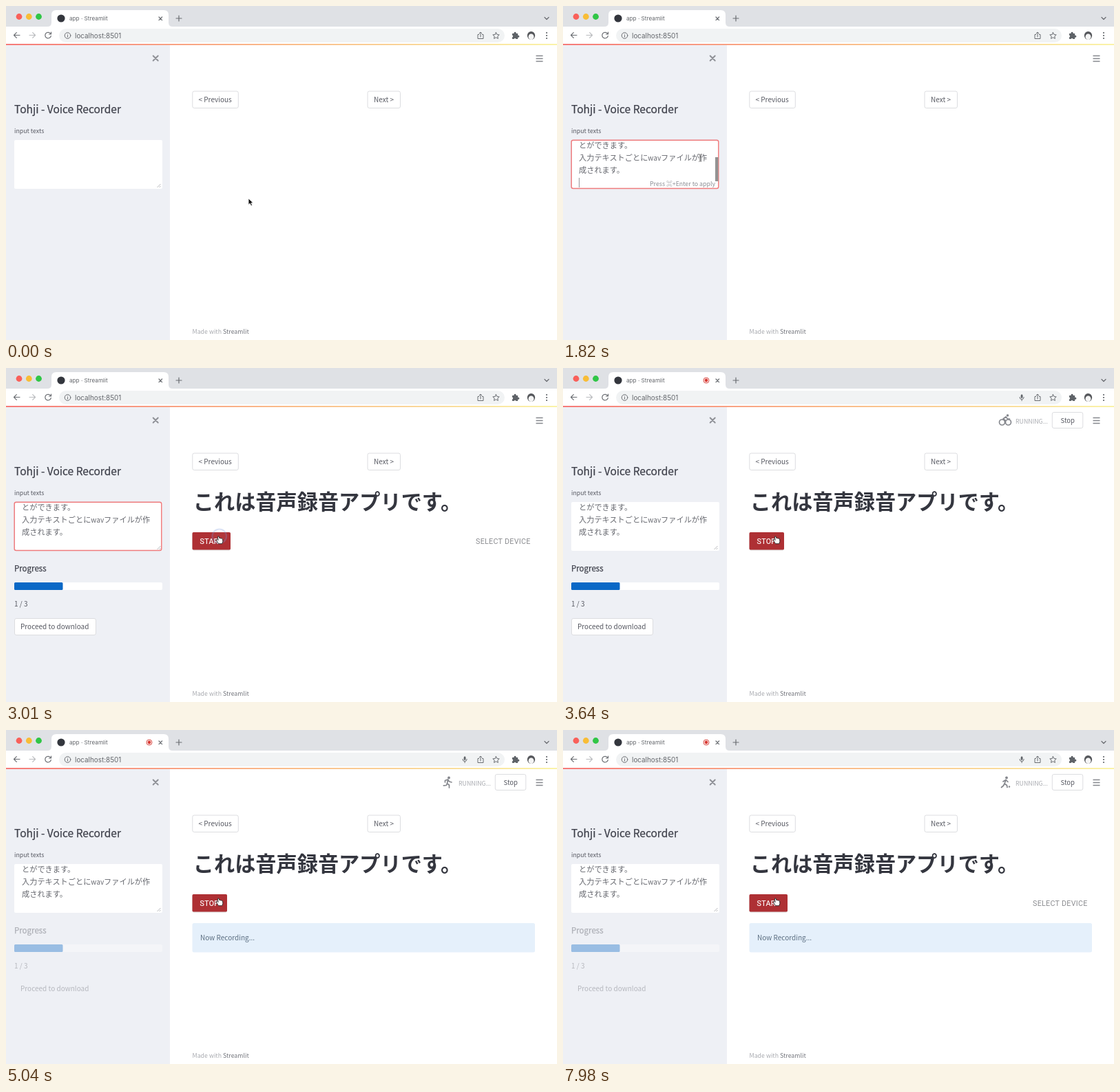
Write an HTML page that moves like this. It is 800 px wide and 486 px high and loops after 8 s.

```html
<!DOCTYPE html>
<html lang="ja">
<head>
<meta charset="utf-8">
<title>Voice Recorder</title>
<style>
  html, body { margin: 0; width: 100%; height: 100%; overflow: hidden; background: #fff; }
  svg { display: block; width: 800px; height: 486px; }
  text { font: 10px "Noto Sans CJK JP", "Noto Sans CJK", sans-serif; fill: #565861; white-space: pre; }
  .chrome { font-family: Inter, sans-serif; fill: #63666b; }
  .small { font-size: 8.8px; }
  .pale { fill: #a9abb0; }
  .medium { fill: #3f414b; stroke: #3f414b; stroke-width: .25px; }
  .area text { font-size: 11.2px; fill: #66686f; }
  .area .latin { font-size: 10px; }
  .mui { font: 10.7px Roboto, sans-serif; letter-spacing: .3px; }
  .white { fill: #fff; stroke: #fff; stroke-width: .2px; }
  .button { fill: #fff; stroke: #dcdde0; }
  .icon { fill: none; stroke: #696c71; stroke-width: 1.2; stroke-linecap: round; stroke-linejoin: round; }
  .thin { stroke-width: 1; }
  .figure { fill: none; stroke: #85878d; stroke-width: 1.7; stroke-linecap: round; stroke-linejoin: round; }
  .figure .head { fill: #85878d; stroke: none; }
</style>
</head>
<body>
<svg viewBox="0 0 800 486">
  <defs>
    <linearGradient id="rainbow">
      <stop stop-color="#f67a78"/><stop offset=".5" stop-color="#fabb8a"/><stop offset="1" stop-color="#faf3a8"/>
    </linearGradient>
    <clipPath id="areaClip"><rect x="13" y="196" width="213" height="69"/></clipPath>
  </defs>

  <!-- Browser -->
  <rect width="800" height="486" fill="#fff"/>
  <rect width="800" height="30" fill="#dfe1e5"/>
  <circle cx="19" cy="15.500" r="4.400" fill="#f9605a"/>
  <circle cx="33.300" cy="15.500" r="4.400" fill="#f8bd36"/>
  <circle cx="47.500" cy="15.500" r="4.400" fill="#30c646"/>
  <path d="M60 30Q66 30 66 24V13Q66 6 73 6H229Q236 6 236 13V24Q236 30 242 30Z" fill="#fff"/>
  <circle cx="80" cy="18" r="5.600" fill="#33363d"/>
  <text class="chrome" x="92" y="21" style="font-size:8.200px">app · Streamlit</text>
  <path class="icon" d="M222 16l4.600 4.600M226.600 16l-4.600 4.600M247 18h8M251 14v8M782 16.500l3 3 3-3"/>
  <g class="icon">
    <path d="M20 42.500H11.500M15.300 38.700l-3.800 3.800 3.800 3.800"/>
    <path stroke="#b9bbbe" d="M34 42.500h8.500M38.700 38.700l3.800 3.800-3.800 3.800"/>
    <path d="M64.500 40a4.300 4.300 0 1 0 .8 3.700M65.500 38v3h-3"/>
  </g>
  <rect x="77" y="33" width="647" height="20" rx="10" fill="#f1f3f4"/>
  <g class="icon thin">
    <circle cx="89.500" cy="43" r="4.300"/>
    <path d="M89.500 42.700v2.300M89.500 41v0"/>
    <path d="M686.500 41.500h-1.500v6h8v-6h-1.500M689 45v-6.500M687 40l2-2 2 2"/>
    <path d="M711.500 38.500l1.400 3 3.300.4-2.400 2.200.6 3.300-2.900-1.600-2.900 1.600.6-3.300-2.400-2.200 3.300-.4Z"/>
  </g>
  <text class="chrome" x="100" y="46.500" style="font-size:9.900px">localhost:8501</text>
  <path fill="#5f6368" d="M735 40h2.500a1.700 1.700 0 1 1 3.200 0h2.500v2.700a1.600 1.600 0 1 1 0 3V48h-2.700a1.600 1.600 0 0 0-3 0H735v-2.600a1.500 1.500 0 0 0 0-2.900Z"/>
  <ellipse cx="762.500" cy="43" rx="5.700" ry="6" fill="#55575b"/>
  <ellipse cx="762.500" cy="44.800" rx="4" ry="4.300" fill="#f5f5f5"/>
  <g fill="#5f6368"><circle cx="785" cy="39" r="1.100"/><circle cx="785" cy="43" r="1.100"/><circle cx="785" cy="47" r="1.100"/></g>
  <g id="tabRecording">
    <circle cx="208" cy="18" r="4" fill="none" stroke="#d9504a"/><circle cx="208" cy="18" r="2.400" fill="#d93b35"/>
    <rect x="664.700" y="38.500" width="2.800" height="5.500" rx="1.400" fill="#5f6368"/>
    <path class="icon thin" d="M663 42.500a3.100 3.100 0 0 0 6.200 0M666.100 45.700v2"/>
  </g>

  <!-- Sidebar -->
  <rect y="57" width="238" height="429" fill="#eef0f5"/>
  <rect y="55" width="800" height="2" fill="url(#rainbow)"/>
  <path d="M213.700 72.500l7 7M220.700 72.500l-7 7" stroke="#8f9197" stroke-width="2" stroke-linecap="round"/>
  <text class="medium" x="12" y="155.500" style="font-size:15.500px">Tohji - Voice Recorder</text>
  <text class="small" x="12" y="185">input texts</text>
  <rect x="12" y="195" width="215" height="71" rx="2" fill="#fff"/>
  <g id="areaText" class="area" clip-path="url(#areaClip)">
    <text x="23" y="207">とができます。</text>
    <text x="23" y="225">入力テキストごとに<tspan class="latin">wav</tspan>ファイルが作</text>
    <text x="23" y="243">成されます。</text>
  </g>
  <path id="resizer" d="M219.500 264l5-5M222.500 264l2-2" stroke="#a5a6aa" stroke-width=".8"/>
  <rect id="focusRing" x="12.200" y="195.300" width="213.600" height="70.200" rx="2.500" fill="none" stroke="#ee7b7d" stroke-width="1.500"/>
  <path id="caret" d="M23.500 250v14" stroke="#96979c"/>
  <g id="pasteHint">
    <rect x="221" y="220" width="4.500" height="35" fill="#939393"/>
    <text class="small" x="126" y="261.500" style="fill:#8b8d93">Press ⌘+Enter to apply</text>
  </g>
  <g id="progress">
    <text class="medium" x="12" y="296" style="font-size:11.500px">Progress</text>
    <rect x="12" y="312" width="215" height="11" rx="2" fill="#fff"/>
    <rect x="12" y="312" width="70.500" height="11" rx="1.500" fill="#0a68c6"/>
    <text x="12" y="347">1 / 3</text>
    <rect id="downloadButton" class="button" x="12.500" y="364.500" width="118" height="24" rx="2.500"/>
    <text x="21" y="380">Proceed to download</text>
  </g>

  <!-- Main pane -->
  <path d="M769.500 72.500h10M769.500 76.500h10M769.500 80.500h10" stroke="#85878d" stroke-width="1.500"/>
  <rect class="button" x="270.800" y="124" width="66.500" height="24.500" rx="2.500"/>
  <text x="279.500" y="140">&lt; Previous</text>
  <rect class="button" x="525" y="124" width="47.500" height="24.500" rx="2.500"/>
  <text x="534" y="140">Next &gt;</text>
  <text x="270.500" y="477" class="pale" style="font-size:8.800px">Made with <tspan fill="#73757c">Streamlit</tspan></text>

  <g id="status">
    <g class="figure">
      <g id="bike">
        <circle cx="637.500" cy="79" r="4"/><circle cx="646.500" cy="79" r="4"/>
        <path d="M642 80v-4l-3-2 4-3 2.500 3h3"/><circle class="head" cx="645.500" cy="69" r="1.800"/>
      </g>
      <g id="run">
        <circle class="head" cx="643" cy="69.500" r="1.900"/>
        <path d="M637.500 76v-2.500l4-1.500 2 3 3.500 1M641.500 73l-1 5 3 2v4M640.300 78l-1 2.500-4 .3"/>
      </g>
      <g id="kick">
        <circle class="head" cx="644" cy="69.500" r="1.900"/>
        <path d="M639 75l4-2.500 3 3M643 73l-2 5 3.500 2.500.5 3M641 78l-1.500 3-3 2.500"/>
        <circle class="head" cx="648" cy="82.500" r="1.200"/>
      </g>
    </g>
    <text class="small pale" x="657" y="81">RUNNING...</text>
    <rect class="button" x="710.300" y="64.500" width="44.500" height="23" rx="2.500"/>
    <text x="722.500" y="79.500" style="font-size:9.500px">Stop</text>
  </g>

  <text id="heading" x="271.800" y="205.500" style="font-size:30.200px;font-weight:700;fill:#34363f">これは音声録音アプリです。</text>
  <g id="recorder">
    <rect id="shadow" x="270.500" y="240" height="25.500" rx="2" fill="#000" opacity=".14"/>
    <rect id="recordButton" x="270.500" y="239" height="25.500" rx="1.800"/>
    <text id="recordLabel" class="mui white" x="281.500" y="255.700"></text>
    <text id="selectDevice" class="mui" x="682" y="255.700" style="fill:#8b8c90">SELECT DEVICE</text>
  </g>
  <g id="notice">
    <rect x="270.500" y="281" width="497.500" height="42.500" rx="2.500" fill="#e5f0fb"/>
    <text x="282" y="306" style="fill:#5b6e81">Now Recording...</text>
  </g>

  <!-- Pointer -->
  <circle id="clickRing" cx="309.800" cy="244.800" fill="#fff" fill-opacity=".12" stroke="#7d9bdd" stroke-width="2.200"/>
  <g id="pointer">
    <path id="arrow" d="M0 0v9.300l2.200-2 1.600 3.500 1.700-.8-1.500-3.300h3Z" fill="#111" stroke="#fff" stroke-width=".8"/>
    <path id="beam" d="M-2-5.500q2 0 2 1.500v8q0 1.500-2 1.500M2-5.500q-2 0-2 1.500v8q0 1.500 2 1.500" fill="none" stroke="#777" stroke-width=".8"/>
    <path id="hand" d="M-.8-4.800q-1.700-.8-1.900.8l.8 4.600-1.600-1.300q-1.700-.2-1.200 1.200l3.200 5.200h5.300l1.100-3.300-.3-3.400q-.6-1.200-1.500-.6-.6-1-1.700-.5-.6-.8-1.600-.3Z" fill="#fff" stroke="#222" stroke-width=".9"/>
  </g>
</svg>
<script>
const LOOP = 8000, STEP = 70;
const FIGURES = ["run", "run", "bike", "kick", "kick", "bike", "run", "bike", "bike"];
const CLICKS = [2960, 6510];
// Pointer stops: time, x, y
const PATH = [[630, 352, 280], [1120, 199, 221], [2310, 199, 221], [2800, 310, 250], [LOOP, 310, 250]];

const parts = Object.fromEntries([...document.querySelectorAll("[id]")].map(e => [e.id, e]));
const within = (t, start, end = LOOP) => t >= start && t < end;
const clamp = v => Math.max(0, Math.min(1, v));
const ease = v => v * v * (3 - 2 * v);
const show = (id, visible) => { parts[id].style.display = visible ? "" : "none"; };

function pointerAt(t) {
  const next = PATH.findIndex(p => t < p[0]);
  if (next <= 0) return PATH[0].slice(1);
  const [t0, x0, y0] = PATH[next - 1], [t1, x1, y1] = PATH[next];
  const k = ease((t - t0) / (t1 - t0));
  return [x0 + (x1 - x0) * k, y0 + (y1 - y0) * k];
}

function drawSidebar(t) {
  const editing = within(t, 1400, 2030);
  const stale = clamp((t - 4200) / 350);
  show("areaText", t >= 1400);
  show("pasteHint", editing);
  show("focusRing", within(t, 1190, 3080));
  show("caret", editing);
  show("resizer", !editing);
  show("progress", t >= 2240);
  parts.progress.style.opacity = 1 - .63 * stale;
  parts.downloadButton.style.opacity = 1 - stale;
}

function drawRecorder(t) {
  const disabled = within(t, 3080, 3360) || within(t, 6580, 7140);
  const stop = within(t, 3360, 6580);
  const width = stop ? 50.5 : 55.5;
  show("heading", t >= 2240);
  show("recorder", t >= 2380);
  show("selectDevice", !stop && !disabled);
  show("shadow", !disabled);
  show("notice", t >= 3990);
  parts.shadow.setAttribute("width", width);
  parts.recordButton.setAttribute("width", width);
  parts.recordButton.setAttribute("fill", disabled ? "#cf8d8e" : t >= 2700 ? "#ae3034" : "#f2504f");
  parts.recordLabel.textContent = stop ? "STOP" : "START";
  parts.recordLabel.style.opacity = disabled ? .25 : 1;
  return disabled;
}

function drawStatus(t) {
  show("tabRecording", t >= 3220);
  show("status", within(t, 2030, 2240) || t >= 3220);
  const figure = FIGURES[Math.floor(t / (2 * STEP)) % FIGURES.length];
  for (const id of ["bike", "run", "kick"]) show(id, id === figure);
}

function drawPointer(t, disabled) {
  const [x, y] = pointerAt(t);
  const overArea = x > 12 && x < 227 && y > 195 && y < 266;
  const overButton = t >= 2700 && x > 271 && y < 265 && !disabled;
  const shape = overArea ? "beam" : overButton ? "hand" : "arrow";
  for (const id of ["arrow", "beam", "hand"]) show(id, id === shape);
  parts.pointer.setAttribute("transform", `translate(${x} ${shape === "arrow" && t > 2700 ? y - 5 : y})`);

  const click = CLICKS.find(c => within(t, c, c + 350));
  show("clickRing", click !== undefined);
  if (click === undefined) return;
  const age = t - click;
  parts.clickRing.setAttribute("r", 7.5 + 10 * clamp(age / 180));
  parts.clickRing.style.opacity = Math.min(clamp(age / 180), clamp((350 - age) / 100));
}

function render(now) {
  const t = Math.floor((now % LOOP) / STEP) * STEP;
  drawSidebar(t);
  drawStatus(t);
  drawPointer(t, drawRecorder(t));
  requestAnimationFrame(render);
}
render(performance.now());
</script>
</body>
</html>
```
